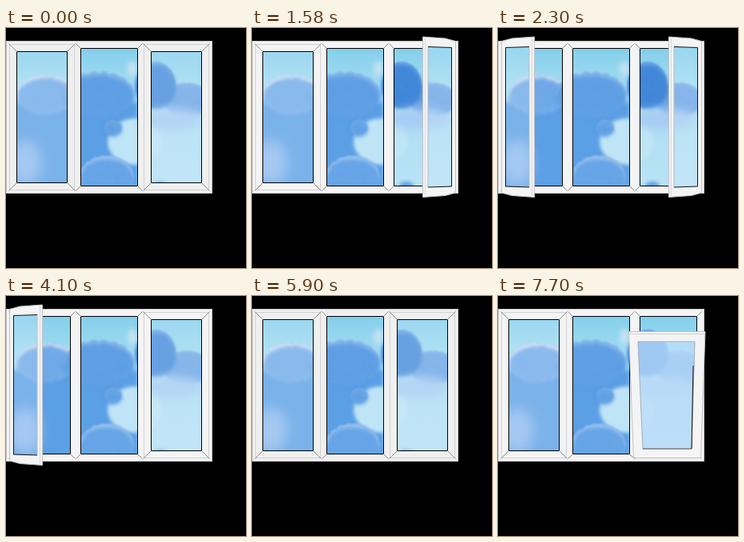
Recreate the animation shown at these times as an HTML page with a canvas. Size 300 by 300 pixels, loop 8 s.

```html
<!DOCTYPE html>
<html lang="en">
<head>
<meta charset="utf-8">
<title>Window</title>
<style>
html, body { margin: 0; width: 100%; height: 100%; overflow: hidden; background: #000; }
canvas { display: block; width: 300px; height: 300px; }
</style>
</head>
<body>
<canvas id="stage" width="300" height="300"></canvas>
<script>
const ctx = document.getElementById('stage').getContext('2d');
const WHITE = '#f4f4f5', EDGE = '#c2c2c4', SEAM = '#8a8a8c', DARK = '#111';
const TOP = 25, HEIGHT = 172, WIDTH = 71, BOTTOM = TOP + HEIGHT;
const TINT = 'rgba(222,236,250,0.24)';
const sky = paintSky();

function seeded(seed) {
  return () => (seed = (seed * 16807) % 2147483647) / 2147483647;
}

function paintSky() {
  const canvas = document.createElement('canvas');
  canvas.width = canvas.height = 300;
  const c = canvas.getContext('2d');
  const rand = seeded(77);

  const oval = (x, y, rx, ry, color, blur) => {
    c.filter = `blur(${blur}px)`;
    c.fillStyle = color;
    c.beginPath();
    c.ellipse(x, y, rx, ry, 0, 0, 7);
    c.fill();
  };
  // Oval body with small puffs round its border, lit from above
  const cloud = (x, y, rx, ry, base, rim) => {
    const puffs = Array.from({ length: 18 }, (_, i) => {
      const a = i / 18 * Math.PI * 2, r = Math.min(rx, ry) * (0.22 + 0.14 * rand());
      return [x + Math.cos(a) * (rx - r), y + Math.sin(a) * (ry - r), r];
    });
    for (const [px, py, r] of puffs) oval(px, py, r, r, rim, 1);
    oval(x, y + 3, rx * 0.86, ry * 0.82, base, 3);
    for (const [px, py, r] of puffs) oval(px, py + r * 0.6, r, r * 0.9, base, 2.5);
  };

  const g = c.createLinearGradient(0, TOP, 0, BOTTOM);
  g.addColorStop(0, '#84cfec');
  g.addColorStop(0.35, '#aadff2');
  g.addColorStop(1, '#b9e2f6');
  c.fillStyle = g;
  c.fillRect(0, 0, 300, 300);

  c.filter = 'blur(3px)';
  c.fillStyle = '#5b9fe5';
  c.fillRect(-9, 92, 175, 130);
  cloud(50, 82, 36, 24, '#6fa9e8', '#c9daf2');
  cloud(116, 82, 44, 28, '#5f9fe4', '#86b7ea');
  oval(24, 168, 20, 28, '#93bdee', 8);
  oval(161, 142, 34, 29, '#bfe4f6', 2);
  cloud(134, 124, 10, 9, '#64a3e6', '#7fb3ea');
  cloud(126, 186, 34, 27, '#67a5e7', '#95c0ef');

  oval(158, 51, 6, 10, '#c4e2f2', 3);
  cloud(226, 88, 28, 20, '#6ba4e5', '#7aaee8');
  cloud(187, 70, 25, 28, '#4388d9', '#65a2e4');
  oval(208, 114, 40, 13, '#a6ccf3', 6);
  oval(193, 198, 9, 6, '#5b9fe6', 2);
  return canvas;
}

function trace(pts) {
  ctx.beginPath();
  for (const [x, y] of pts) ctx.lineTo(x, y);
}

function stroke(color, ...pts) {
  trace(pts);
  ctx.strokeStyle = color;
  ctx.stroke();
}

function panel(pts, fill, border) {
  trace(pts);
  ctx.closePath();
  ctx.fillStyle = fill;
  ctx.fill();
  ctx.strokeStyle = border;
  ctx.stroke();
}

function glass(pts, tint) {
  ctx.save();
  trace(pts);
  ctx.clip();
  ctx.drawImage(sky, 0, 0);
  if (tint) {
    ctx.fillStyle = tint;
    ctx.fillRect(0, 0, 300, 300);
  }
  ctx.restore();
}

function pane(x, inset = 0, tint) {
  const l = x + inset + 0.5, r = x + WIDTH - inset + 0.5;
  const t = TOP + inset + 0.5, b = BOTTOM - inset + 0.5;
  const pts = [[l, t], [r, t], [r, b], [l, b]];
  glass(pts, tint);
  stroke('#000', ...pts, pts[0]);
}

// Mitre seams running outwards from the four corners of a pane
function mitres(x, inset, reach) {
  for (const [cx, dx] of [[x + inset, -1], [x + WIDTH - inset, 1]]) {
    for (const [cy, dy] of [[TOP + inset, -1], [BOTTOM - inset, 1]]) {
      stroke(SEAM, [cx + 0.5, cy + 0.5], [cx + dx * reach + 0.5, cy + dy * reach + 0.5]);
    }
  }
}

function closedSash(x) {
  ctx.strokeStyle = '#d2d2d4';
  ctx.strokeRect(x - 4.5, TOP - 4.5, WIDTH + 10, HEIGHT + 10);
  pane(x, 4, TINT);
  mitres(x, 4, 10);
}

// Side-hung sash swung towards the viewer; dir points from hinge to free edge
function swungSash(hinge, dir) {
  const at = (d, y) => [hinge + dir * d, y];
  const flip = ([x, y]) => [x, 222.5 - y];
  const mirror = pts => [...pts, ...pts.map(flip).reverse()];

  panel(mirror([at(0, 16.5), at(13, 13), at(41, 11)]), WHITE, EDGE);
  const near = at(34.5, 23.5), far = at(5, 24.5);
  glass(mirror([far, near]), TINT);
  stroke('#b4bac2', near, flip(near));
  stroke(DARK, near, far, flip(far), flip(near));
  stroke('#d8d8da', at(38, 13), at(38, 209));
}

function tiltedSash() {
  panel([[163.5, 44.5], [259, 44.5], [253.5, 202.5], [169.5, 202.5]], WHITE, EDGE);
  stroke('#d0d0d2', [164, 47.5], [258, 47.5]);
  const tl = [175, 57], tr = [246, 57], br = [242, 191], bl = [181, 191];
  glass([tl, tr, br, bl], 'rgba(190,222,250,0.75)');
  stroke('#a3aeb8', bl, tl, tr, br);
  stroke(DARK, [244, 87], br);
  stroke('#444', bl, br);
}

function draw(step) {
  const leftOpen = step === 2 || step === 3;
  const rightOpen = step === 1 || step === 2;
  const tilted = step === 5;
  const [left, middle, right] = [9, 93, 177];

  ctx.lineWidth = 1;
  ctx.fillStyle = '#000';
  ctx.fillRect(0, 0, 300, 300);
  ctx.fillStyle = step % 4 ? WHITE : '#f0f0f0';
  ctx.fillRect(0, 16, 258, 191);
  ctx.strokeStyle = EDGE;
  ctx.strokeRect(0.5, 16.5, 257, 190);

  pane(middle);
  mitres(middle, 0, 6);

  for (const [x, open] of [[left, leftOpen], [right, rightOpen || tilted]]) {
    if (open) {
      pane(x);
      mitres(x, 0, 6);
    } else {
      closedSash(x);
    }
  }
  if (leftOpen) swungSash(4.5, 1);
  if (rightOpen) swungSash(254.5, -1);
  if (tilted) tiltedSash();
}

// Steps change every 1800 ms, the first one at 500 ms
const LOOP = 8000, HOLD = 1800, FIRST = 500;
const start = performance.now();
let shown = -1;
function tick() {
  const t = (performance.now() - start) % LOOP;
  const step = Math.floor((t + HOLD - FIRST) / HOLD);
  if (step !== shown) draw(step);
  shown = step;
  requestAnimationFrame(tick);
}
tick();
</script>
</body>
</html>
```
